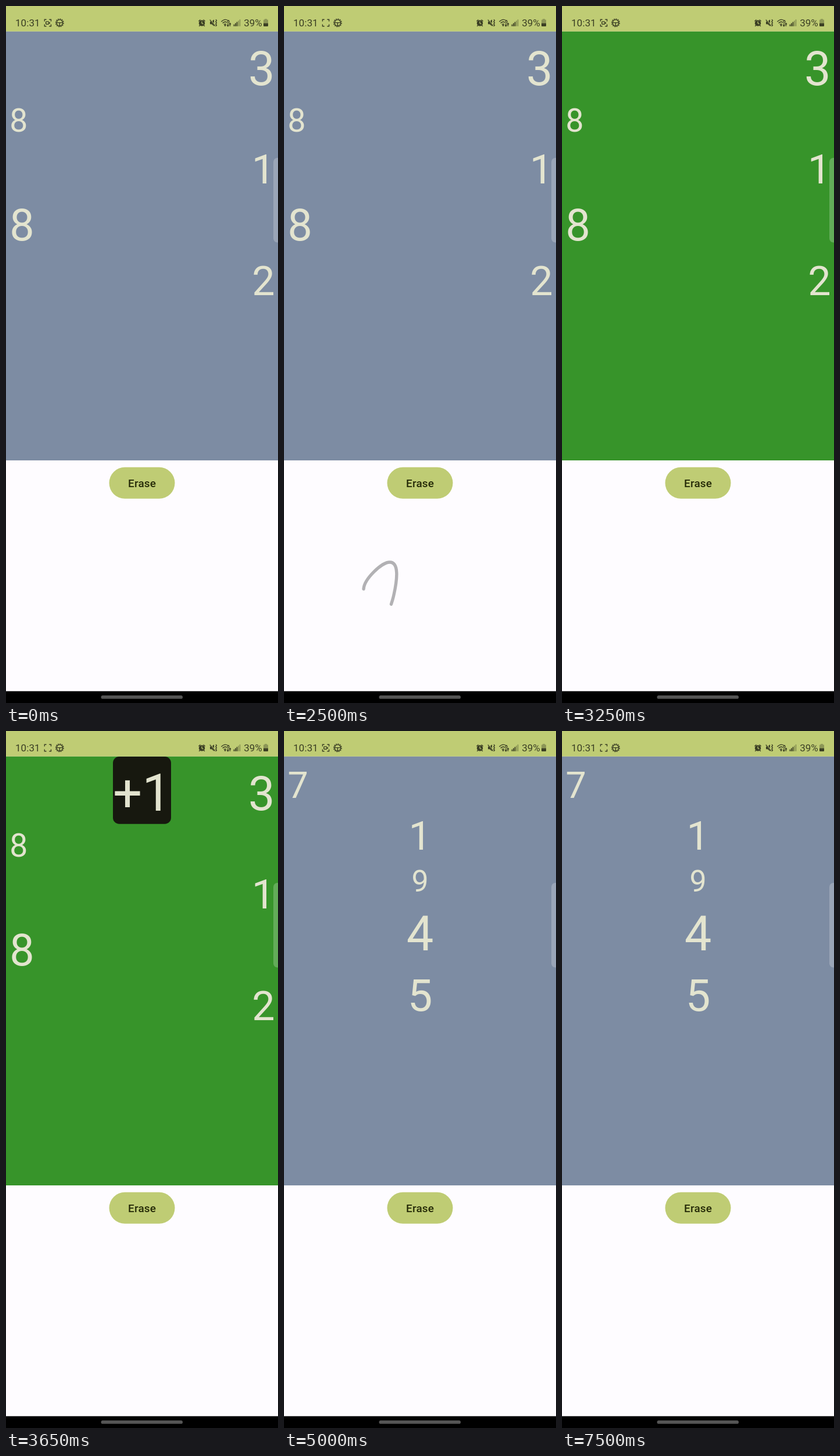
Write an HTML page that moves like this. It is 468x1198 px and loops after 8000 ms.

```html
<!DOCTYPE html>
<html lang="en">
<head>
<meta charset="utf-8">
<title>Handwriting sums</title>
<style>
  html, body { margin: 0; width: 100%; height: 100%; overflow: hidden; background: #fefcff; }
  svg { display: block; width: 100%; height: 100%; }
  text { font-family: Roboto, Arial, sans-serif; }
  .digits, .score text { fill: #e3e4cf; }
  .bar text { font-size: 17px; fill: #3b3f24; }
  .line { fill: none; stroke: #3b3f24; stroke-width: 1.4; }
  .solid { fill: #3b3f24; }
  .ink { fill: none; stroke: #b2b1b4; stroke-width: 5.4; stroke-linecap: round; stroke-linejoin: round; stroke-dasharray: 1 2; }
</style>
</head>
<body>
<svg viewBox="0 0 468 1198">
  <rect width="468" height="1198" fill="#fefcff"/>
  <rect id="panel" y="43.5" width="468" height="737.5"/>
  <g class="digits" id="first"></g>
  <g class="digits" id="second"></g>
  <g class="score" id="score">
    <rect x="184" y="44" width="100" height="115.7" rx="10.8" fill="#17180f"/>
    <text x="234" y="136.5" font-size="88.6" text-anchor="middle">+1</text>
  </g>
  <rect x="460" y="261" width="20" height="145.5" rx="7" fill="#fff" opacity=".22"/>

  <g class="bar">
    <rect width="468" height="43.7" fill="#bfcc74"/>
    <text x="16" y="34.6" letter-spacing=".05">10:31</text>
    <text x="409.2" y="34.6">39%</text>
    <!-- screen recorder -->
    <path class="line" d="M66.3 26.5V23.3H69.5M74.3 23.3H77.5V26.5M77.5 31.5V34.7H74.3M69.5 34.7H66.3V31.5"/>
    <g id="camera">
      <rect class="line" x="68.6" y="26.9" width="5" height="4.4" rx="1"/>
      <path class="solid" d="M73.8 28.9L75.8 27.2V31L73.8 29.6Z"/>
    </g>
    <!-- gear -->
    <circle class="line" cx="92.3" cy="28.9" r="6.7" stroke-dasharray="2.1 1.4"/>
    <circle class="line" cx="92.3" cy="28.9" r="5.3"/>
    <path class="line" d="M87 28.6H97.6M92.3 28.6V34"/>
    <!-- alarm -->
    <circle class="solid" cx="337" cy="29.4" r="5.2"/>
    <path class="line" d="M331.4 26.2L334.5 23.6M342.6 26.2L339.5 23.6M333.6 33L332.3 34.8M340.4 33L341.7 34.8"/>
    <path d="M337 26.4V29.6L339.4 31" fill="none" stroke="#bfcc74" stroke-width="1.2"/>
    <!-- muted speaker -->
    <path class="solid" d="M351 26.8H353.8L358 23.2V34.8L353.8 31.2H351Z"/>
    <path d="M350.6 22.6L360.8 35" stroke="#bfcc74" stroke-width="2.4"/>
    <path class="line" d="M350.8 23.6L359.8 34.4M361 23.2L362.4 25L360.8 27L362.4 29L360.8 31L362.4 33L361 34.8"/>
    <!-- wireless -->
    <path class="line" d="M370.4 27Q376.5 20.9 382 25M372.6 29.5Q376.8 25.6 380.3 28.4M374.8 31.8Q377 30 379 31.6"/>
    <circle class="solid" cx="377" cy="33.4" r="1.4"/>
    <text x="380.6" y="28.6" style="font-size:8px;font-weight:700">6</text>
    <path class="line" d="M381.8 29.6V34.4M380.2 33L381.8 34.8L383.4 33M385.4 34.8V30M383.8 31.4L385.4 29.6L387 31.4"/>
    <!-- signal -->
    <g id="signal"></g>
    <!-- battery -->
    <path class="solid" opacity=".38" d="M445 22.3H449V23.6H450Q451 23.6 451 24.6V30H443V24.6Q443 23.6 444 23.6H445Z"/>
    <path class="solid" d="M443 29.8H451V34Q451 35 450 35H444Q443 35 443 34Z"/>
  </g>

  <rect x="177.5" y="792.8" width="113" height="54" rx="27" fill="#bfcc74"/>
  <text x="234" y="827.2" font-size="18.9" font-weight="500" letter-spacing=".13" text-anchor="middle" fill="#262b08">Erase</text>

  <path class="ink" pathLength="1" d="M137 1002C138 985 168 956 182 956C198 956 195 985 189 1012C184 1035 171 1060 171.5 1069C172 1078 190 1070 207 1066C232 1059 255 1052 261 1049.500Q264 1046 266.5 1043"/>
  <path class="ink" pathLength="1" d="M264 957C275 952 289 947 301 948C310 950 308 962 304 980C298 1007 292 1032 292 1046C293 1062 308 1070 328 1071C350 1071 362 1066 375.5 1062.5"/>

  <rect y="1177.7" width="468" height="21" fill="#000"/>
  <rect x="163.5" y="1185" width="140.5" height="5.8" rx="2.9" fill="#555"/>
</svg>
<script>
const LOOP = 8000, STEP = 50;
const BLUE = '#7d8ca3', GREEN = '#37942a';
const $ = id => document.getElementById(id);

function add(parent, tag, attrs, label = '') {
  const el = document.createElementNS('http://www.w3.org/2000/svg', tag);
  for (const key in attrs) el.setAttribute(key, attrs[key]);
  el.textContent = label;
  parent.append(el);
}

// digit, side, baseline, size
const EDGE = { start: 6.2, middle: 234, end: 462.6 };
const SUMS = {
  first: [['3', 'end', 135.5, 81], ['8', 'start', 216, 55.4], ['1', 'end', 304.5, 71],
          ['8', 'start', 403, 75.6], ['2', 'end', 497, 70]],
  second: [['7', 'start', 114.7, 63], ['1', 'middle', 203.5, 69], ['9', 'middle', 275.6, 52],
           ['4', 'middle', 377, 83], ['5', 'middle', 480.7, 76]]
};
for (const id in SUMS)
  for (const [digit, side, y, size] of SUMS[id])
    add($(id), 'text', { x: EDGE[side], y, 'font-size': size, 'text-anchor': side }, digit);

for (let i = 0; i < 5; i++) {
  const h = 3.2 + i * 2.1;
  add($('signal'), 'rect', { x: 391.6 + i * 2.5, y: 34.8 - h, width: 1.7, height: h,
    class: 'solid', opacity: i < 3 ? 1 : .4 });
}

const STROKES = [[2300, 2700], [2800, 3200]];
const SOLVED = 3250, NEXT = 3700;
const inks = document.querySelectorAll('.ink');
const show = (el, on) => { el.style.visibility = on ? 'visible' : 'hidden'; };

// critically damped spring from 0 to 1
function spring(ms) {
  const x = Math.max(0, ms) / 50;
  return 1 - (1 + x) * Math.exp(-x);
}

function draw(now) {
  const t = Math.floor((now % LOOP) / STEP) * STEP;

  show($('camera'), t % 1000 < 500);
  inks.forEach((ink, i) => {
    const [from, to] = STROKES[i];
    show(ink, t > from && t < SOLVED);
    ink.style.strokeDashoffset = Math.max(0, 1 - (t - from) / (to - from));
  });

  // the right answer turns the panel green until the next sum
  $('panel').setAttribute('fill', t >= SOLVED && t < NEXT ? GREEN : BLUE);
  show($('first'), t < NEXT);
  show($('second'), t >= NEXT);

  show($('score'), t > SOLVED && t < NEXT + 550);
  $('score').style.opacity = spring(t - SOLVED) - spring(t - NEXT);
}

function tick() {
  draw(performance.now());
  requestAnimationFrame(tick);
}
tick();
</script>
</body>
</html>
```
